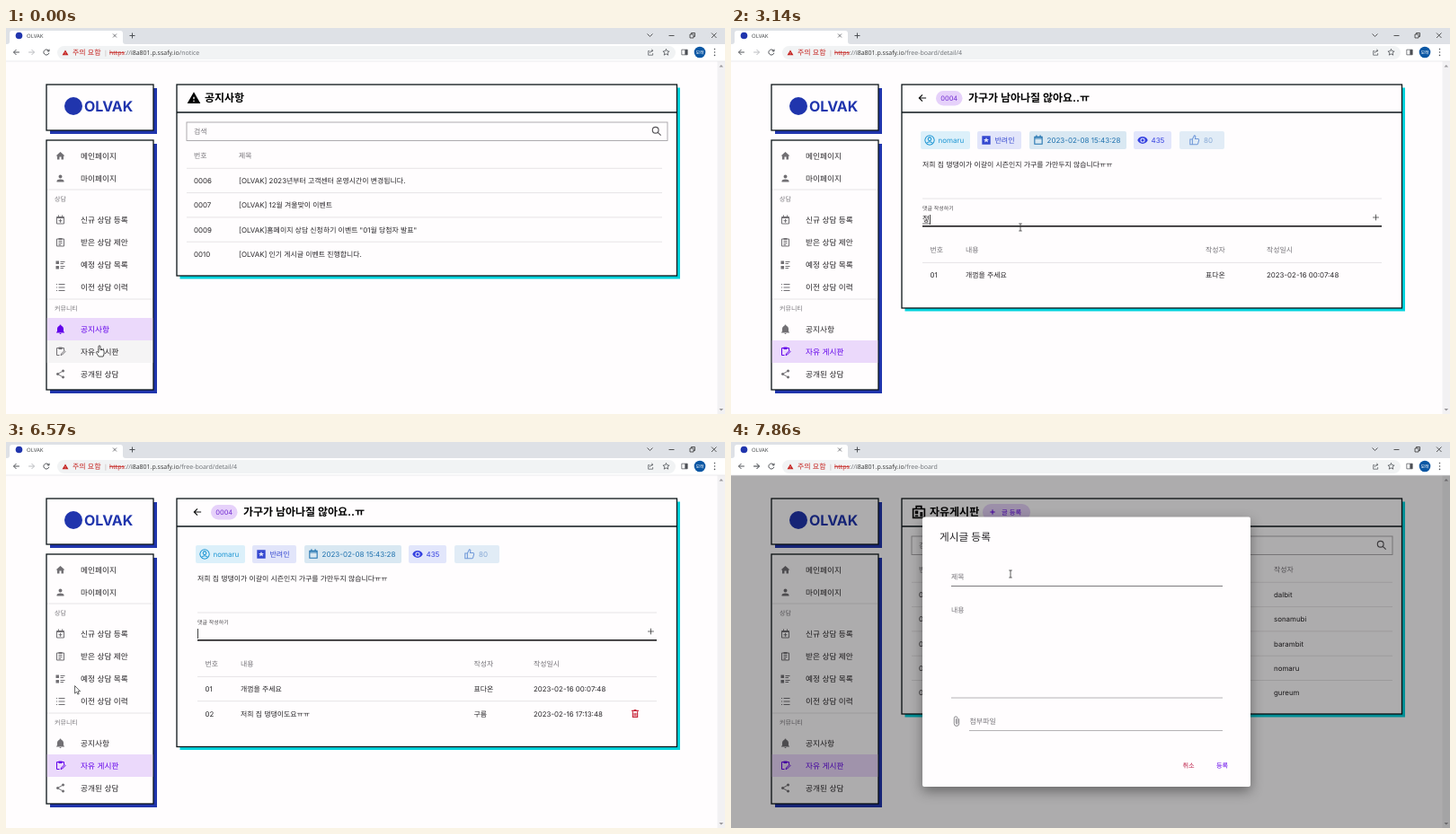
An HTML page for the animation above (8000 ms loop, 800 by 430 pixels).

```html
<!DOCTYPE html>
<html lang="ko">
<head>
<meta charset="utf-8">
<title>OLVAK</title>
<style>
html, body { margin: 0; width: 100%; height: 100%; overflow: hidden; background: #fffdfe; }
svg { display: block; width: 800px; height: 430px; }
text { font-family: Inter, 'Noto Sans CJK KR', 'Noto Sans CJK', sans-serif; white-space: pre; text-rendering: geometricPrecision; }
.ui text { font-family: 'Open Sans', 'Noto Sans CJK KR', 'Noto Sans CJK', sans-serif; }
#dialog { transform-origin: 293px 67px; }
#dialog > rect { filter: drop-shadow(0 5px 7px rgba(0,0,0,.4)); }
</style>
</head>
<body>
<svg id="stage" viewBox="0 0 800 430"></svg>
<script>
const LOOP = 8000, FRAMES = 56;
const INK = '#262427', GREY = '#77757a', PURPLE = '#6200ea', NAVY = '#2035ad', CYAN = '#00d3dd', RULE = '#e6e4e6';

// 24-unit icons: f = filled path, s = stroked path
const ICONS = {
  home: { f: 'M10 20v-6h4v6h5v-8h3L12 3 2 12h3v8z' },
  user: { f: 'M12 4a4 4 0 1 1 0 8 4 4 0 0 1 0-8m0 10c4.4 0 8 1.8 8 4v2H4v-2c0-2.2 3.6-4 8-4' },
  calAdd: { s: 'M4 5h16v15H4zM4 7h16M8 1v4M16 1v4M12 9.500v8M8 13.500h8' },
  clip: { s: 'M4 4h16v16H4zM8 9h8M8 13h8M8 17h5', f: 'M8 2h8v4H8z' },
  details: { s: 'M12 5h10M12 9h7M12 15h10M12 19h7', f: 'M2 3h7v7H2zM2 14h7v7H2z' },
  list: { s: 'M8 5h14M8 12h14M8 19h14M3 5h2M3 12h2M3 19h2' },
  bell: { f: 'M21 19v1H3v-1l2-2v-6c0-3.100 2-5.800 5-6.700V4a2 2 0 0 1 4 0v.3c3 .9 5 3.600 5 6.700v6l2 2M14 21a2 2 0 0 1-4 0' },
  edit: { s: 'M10 20H4V4h16v6M13 20l1-3 7-7 2 2-7 7z', f: 'M8 2h8v5H8z' },
  share: { s: 'M18 5 6 12l12 7', f: 'M18 2a3 3 0 1 0 .1 0zM6 9a3 3 0 1 0 .1 0zM18 16a3 3 0 1 0 .1 0z' },
  warn: { f: 'M1 21h22L12 2zm12-3h-2v-2h2zm0-4h-2v-4h2z' },
  board: { s: 'M3 7h18v14H3zM8 7V3h8v4', f: 'M6 10h5v5H6zM6 17h5v2H6zM14 12h4v7h-4z' },
  search: { s: 'M16 9.500a6.500 6.500 0 1 0-13 0 6.500 6.500 0 1 0 13 0M14.500 14.500 21 21' },
  back: { s: 'M21 12H4M12 4l-8 8 8 8' },
  next: { s: 'M3 12h17M12 4l8 8-8 8' },
  reload: { s: 'M19.500 14a8 8 0 1 1-2-7.500L20 9M20 3v6h-6' },
  plus: { s: 'M12 4v16M4 12h16' },
  close: { s: 'M4 4l16 16M20 4 4 20' },
  face: { s: 'M12 2a10 10 0 1 0 .1 0zM12 6a3.500 3.500 0 1 0 .1 0zM5 19q7-7 14 0' },
  starBox: { f: 'M3 3h18v18H3zM12 6l-1.700 4H6l3.500 2.700L8 17l4-2.600L16 17l-1.500-4.300L18 10h-4.300z' },
  cal: { s: 'M4 5h16v15H4zM4 8h16M8 1v4M16 1v4' },
  eye: { f: 'M12 4.500C7 4.500 2.700 7.600 1 12c1.700 4.400 6 7.500 11 7.500s9.300-3.100 11-7.500c-1.700-4.400-6-7.500-11-7.500M12 17a5 5 0 1 1 0-10 5 5 0 0 1 0 10m0-8a3 3 0 1 0 0 6 3 3 0 0 0 0-6' },
  thumb: { s: 'M7 10l4-8q3 0 2.500 3L13 9h6q2.500.5 2 3l-2 7q-.5 2-2 2H7zM2 10h5v11H2z' },
  trash: { s: 'M6 7v14h12V7M3 5h18M9 3h6M10 10v8M14 10v8' },
  attach: { s: 'M17 7v10a5 5 0 0 1-10 0V6a3.300 3.300 0 0 1 7 0v10a1.500 1.500 0 0 1-3 0V7' },
  star: { s: 'M12 3l2.700 6 6.300.6-4.800 4.200 1.500 6.200L12 16.700 6.300 20l1.500-6.200L3 9.600 9.300 9z' },
  out: { s: 'M8 8H4v13h14v-6M8 15q1-8 10-8M14 3l5 4-5 4' },
  panel: { s: 'M3 4h18v16H3z', f: 'M13 4h8v16h-8z' }
};

const text = (x, y, str, size = 7.9, fill = INK, attrs = '') =>
  `<text x="${x}" y="${y + size * .37}" font-size="${size}" fill="${fill}" ${attrs}>${str}</text>`;
const rect = (x, y, w, h, fill, attrs = '') =>
  `<rect x="${x}" y="${y}" width="${w}" height="${h}" fill="${fill}" ${attrs}/>`;
const line = (x1, x2, y, color = RULE, w = 1) =>
  `<path d="M${x1} ${y}H${x2}" stroke="${color}" stroke-width="${w}"/>`;
const stroke = (d, color, w = 1) => `<path d="${d}" fill="none" stroke="${color}" stroke-width="${w}"/>`;
const group = (id, body, attrs = '') => `<g id="${id}" ${attrs}>${body}</g>`;
const bold = 'font-weight="700"';

function icon(name, x, y, size, color, w = 2) {
  const { f, s } = ICONS[name], k = size / 24;
  return `<g transform="translate(${x - size / 2} ${y - size / 2}) scale(${k})">` +
    (f ? `<path d="${f}" fill="${color}" fill-rule="evenodd"/>` : '') +
    (s ? stroke(s, color, w) : '') + '</g>';
}

const card = (x, y, w, h, shade, d = 4) =>
  rect(x + d, y + d, w, h, shade) + rect(x, y, w, h, '#fffdfe', 'stroke="#0b1418" stroke-width="1.3"');
const panel = bottom => card(190, 63, 556.5, bottom - 63, CYAN, 3.5) + line(190, 746.5, 94, '#0b1418', 1.3);

function browser() {
  const dark = '#4c4f54';
  return rect(0, 0, 800, 18, '#dee1e6') + rect(0, 18, 800, 19, '#fff') +
    '<path d="M1 18q3 0 3-3V6q0-3 3-3H127q3 0 3 3v9q0 3 3 3z" fill="#fff"/>' +
    `<circle cx="14.500" cy="8.500" r="3.800" fill="${NAVY}"/>` + text(23, 8.5, 'OLVAK', 6, '#3c4043') +
    icon('close', 121, 8.5, 6, dark, 3) + icon('plus', 140.5, 8.5, 9, dark, 2.6) +
    stroke('M713.500 6.500l3 3 3-3M737.500 8.500h6M761 7h4v4h-4zM762.500 7V5.500h4v4H765M785 5.500l5.500 5.500M790.500 5.500l-5.500 5.500', '#333', .8) +
    icon('back', 11.5, 27, 9, dark, 2.6) + icon('next', 28.5, 27, 9, '#b9bbbe', 2.6) +
    group('forward', icon('next', 28.5, 27, 9, dark, 2.6)) + icon('reload', 45, 27, 9, dark, 2.6) +
    rect(57, 20, 688, 15, '#f1f3f4', 'rx="7.5"') +
    icon('warn', 66, 27.5, 7.5, '#c5221f') + text(74, 27, '주의 요함', 8, '#c5221f') +
    text(109, 27, '|', 7, '#b9a9a9') + line(115, 132, 27.5, '#c5221f', .7) +
    `<text x="115" y="29.600" font-size="7" fill="#6b6e73"><tspan fill="#c5221f">https</tspan>://<tspan fill="#333">i8a801.p.ssafy.io</tspan><tspan id="path"></tspan></text>` +
    icon('out', 717.5, 27, 8.5, dark) + icon('star', 734.5, 27, 9.5, dark) + icon('panel', 755, 27, 8.5, dark) +
    '<circle cx="772" cy="27" r="6.300" fill="#0b57a4"/>' + text(772, 27, '모래', 5, '#fff', 'text-anchor="middle"') +
    `<path d="M788.500 23.500v.1m0 3.300v.1m0 3.300v.1" stroke="${dark}" stroke-width="1.500" stroke-linecap="round"/>` +
    line(0, 800, 37, '#e3e3e6', .7);
}

const MENU = [
  ['home', '메인페이지', 142.5], ['user', '마이페이지', 167.5],
  ['calAdd', '신규 상담 등록', 214], ['clip', '받은 상담 제안', 239],
  ['details', '예정 상담 목록', 264], ['list', '이전 상담 이력', 289],
  ['bell', '공지사항', 335.5], ['edit', '자유 게시판', 360.5], ['share', '공개된 상담', 385.5]
];

function menu(selected, hovered) {
  return MENU.map(([name, label, y], i) => {
    const on = i === selected;
    const back = on ? '#ebd9fb' : i === hovered ? '#f5f4f5' : '';
    return (back ? rect(45.8, y - 12.5, 117.4, 25, back) : '') +
      icon(name, 60.5, y, 12, on ? PURPLE : '#727074') + text(83, y, label, 8.7, on ? PURPLE : INK);
  }).join('');
}

const sidebar = () =>
  card(45, 63, 119, 51, NAVY) + `<circle cx="75" cy="87" r="10" fill="${NAVY}"/>` +
  text(87, 87, 'OLVAK', 16, NAVY, bold) + card(45, 125, 119, 278, NAVY) +
  line(46, 163, 180) + line(46, 163, 302) +
  text(54, 190.5, '상담', 7, GREY) + text(54, 312.5, '커뮤니티', 7, GREY) +
  group('menuNotice', menu(6, 7)) + group('menuFree', menu(7, -1));

function table(rows, right) {
  let out = rect(201, 105, 535, 20.5, 'none', 'stroke="#a5a3a6" stroke-width=".9"') +
    text(209, 115, '검색', 7.9, GREY) + icon('search', 724, 115, 12.5, '#565458', 2.2) +
    text(209, 142.5, '번호', 7.9, GREY) + text(259, 142.5, '제목', 7.9, GREY) +
    (rows[0][2] ? text(604, 142.5, '작성자', 7.9, GREY) : '');
  rows.forEach(([no, title, by], i) => {
    const y = 170 + i * 27.3;
    out += line(201, right, y - 13.7) + text(209, y, no) + text(259, y, title) + (by ? text(604, y, by) : '');
  });
  return out;
}

const notice = () => panel(276) + icon('warn', 209, 78, 16, '#000') + text(221, 78, '공지사항', 12, '#000', bold) +
  table([
    ['0006', '[OLVAK] 2023년부터 고객센터 운영시간이 변경됩니다.'],
    ['0007', '[OLVAK] 12월 겨울맞이 이벤트'],
    ['0009', '[OLVAK]홈페이지 상담 신청하기 이벤트 "01월 당첨자 발표"'],
    ['0010', '[OLVAK] 인기 게시글 이벤트 진행합니다.']
  ], 730);

const free = () => panel(303) + icon('board', 209, 78, 17, '#000', 2.3) + text(221, 78, '자유게시판', 12, '#000', bold) +
  rect(280, 69, 53, 18.5, '#e6d2f9', 'rx="9.2"') + icon('plus', 291, 78, 8, PURPLE, 3) +
  text(301, 78.5, '글 등록', 7.3, PURPLE) +
  table([
    ['0001', '토끼가 강한 이유를 아십니까?', 'dalbit'],
    ['0002', 'How to 고양이 인테리어!', 'sonamubi'],
    ['0003', '강아지 양치하는 방법', 'barambit'],
    ['0004', '가구가 남아나질 않아요..ㅠ', 'nomaru'],
    ['0005', '이럴거면 일본을 갔습니다', 'gureum']
  ], 736);

const chip = (x, w, name, label, back, color) =>
  rect(x, 115, w, 20, back, 'rx="2"') + icon(name, x + 10, 125, 12.5, color) + text(x + 19.5, 125.3, label, 8, color);

const comments = (byX, atX, rows) =>
  [['번호', '내용', '작성자', '작성일시'], ...rows].map((row, i) => {
    const y = i ? 248 + i * 27.3 : 247;
    return [221.5, 261, byX, atX].map((x, j) => text(x, y, row[j], 7.9, i ? INK : GREY)).join('') +
      (i ? line(213, 724, y - 13.9) : '');
  }).join('');

function detail() {
  const first = ['01', '개껌을 주세요', '표다온', '2023-02-16 00:07:48'];
  const second = ['02', '저희 집 댕댕이도요ㅠㅠ', '구름', '2023-02-16 17:13:48'];
  return group('before', panel(312) + comments(528, 596, [first])) +
    group('after', panel(339.5) + comments(520.5, 587, [first, second]) + icon('trash', 700, 302.5, 10.5, '#c8283c', 2.6)) +
    icon('back', 213, 78, 11, '#111', 2.6) + rect(228, 70, 29.5, 16.5, '#e6d1fa', 'rx="8.2"') +
    text(242.7, 78.3, '0004', 7.5, '#7430d2', 'text-anchor="middle"') +
    text(264, 78, '가구가 남아나질 않아요..ㅠ', 12, '#000', bold) +
    chip(211, 55, 'face', 'nomaru', '#dcf0fa', '#1f97d4') +
    chip(274, 49, 'starBox', '반려인', '#e2e5fa', '#3447d0') +
    chip(332, 108, 'cal', '2023-02-08 15:43:28', '#d9e8f2', '#1c70ae') +
    chip(448, 42, 'eye', '435', '#e2e6fb', '#3440e0') +
    rect(499, 115, 50, 20, '#e1ecf6', 'rx="2"') + icon('thumb', 516, 125, 12.5, '#6f98d8') + text(526, 125.3, '80', 8, '#86a9d6') +
    text(213, 152, '저희 집 댕댕이가 이갈이 시즌인지 가구를 가만두지 않습니다ㅠㅠ') +
    line(213, 724, 190) + line(213, 724, 221, '#a8a6a9') + icon('plus', 717.5, 211, 10, '#444') +
    '<path id="focusLine" stroke="#1c1b1d" stroke-width="1.400"/>' +
    '<text id="label" x="213">댓글 작성하기</text>' +
    `<text id="typed" x="213" y="216.300" font-size="8.700" fill="${INK}"></text>` +
    '<path id="compose" stroke="#333" stroke-width=".7"/><path id="caret" stroke="#111" stroke-width=".8"/>';
}

const dialog = () => rect(213, 83.5, 365, 300.5, '#fffdfe', 'rx="2"') + group('form',
  text(232, 106, '게시글 등록', 11.7, INK, 'font-weight="500"') +
  text(245, 150, '제목', 7.9, GREY) + line(245, 547, 160.5, '#7c7a7d') +
  text(245, 187, '내용', 7.9, GREY) + line(245, 547, 285, '#b4b2b5') +
  icon('attach', 251, 311, 13, '#77757a', 1.6) + text(265.5, 311, '첨부파일', 8, GREY) + line(265, 547, 321.5, '#b4b2b5') +
  text(502.5, 360, '취소', 7.2, '#b8103c') + text(540, 360, '등록', 7.2, PURPLE));

const cursors = () =>
  group('hand', '<path d="M-1 .8a1 1 0 0 1 2 0V4.500h2.500q1.600.3 1.600 2V8q0 2-1 4H-.8L-3.600 7.600q0-1.400 1.400-1L-1 7.600z" fill="#fff" stroke="#222" stroke-width=".8"/>') +
  group('arrow', '<path d="M0 0V8.500L2 6.700 3.300 9.500 4.600 9 3.400 6.200H6z" fill="#fff" stroke="#222" stroke-width=".7"/>') +
  group('beam', stroke('M-1.700-4H1.700M0-4V4M-1.700 4H1.700', '#333', .8));

document.getElementById('stage').innerHTML =
  rect(0, 0, 800, 430, '#fffdfe') + rect(791.5, 37, 8.5, 393, '#f2f1f3') +
  '<path d="M793.500 43.500l2.300-2.500 2.300 2.500zM793.500 424l2.300 2.500 2.300-2.500z" fill="#9a989c"/>' +
  sidebar() + group('notice', notice()) + group('free', free()) + group('detail', detail()) +
  group('scrim', rect(0, 37, 800, 393, '#000')) + group('dialog', dialog()) +
  group('browser', browser(), 'class="ui"') + group('cursor', cursors());

// Tables of [time, value...]
const PAGES = [[0, 'notice', '/notice'], [290, 'free', '/free-board'], [1140, 'detail', '/free-board/detail/4'], [7000, 'free', '/free-board']];
const TYPING = [[0, ''], [2710, 'ㅈ'], [2860, '저'], [3140, '젛'], [3290, '저희'], [3430, '저희 '], [3570, '저희 집'],
  [3710, '저희 집 대'], [3860, '저희 집 댕'], [4000, '저희 집 댕댕'], [4140, '저희 집 댕댕이'], [4290, '저희 집 댕댕이도'],
  [4430, '저희 집 댕댕이도요'], [4570, '저희 집 댕댕이도요ㅠㅠ'], [4710, '']];
const SHAPES = [[0, 'hand'], [430, 'arrow'], [860, 'hand'], [1140, 'arrow'], [1430, 'beam'], [5430, 'arrow'], [5860, 'hand'],
  [6430, 'arrow'], [7290, 'hand'], [7570, 'arrow'], [7860, 'beam']];
const MOVES = [[0, 104, 354], [430, 104, 354], [1000, 290, 249], [1290, 290, 249], [1570, 322, 225], [1710, 322, 222], [5290, 322, 222],
  [6000, 96, 354], [6430, 96, 354], [6860, 18, 23], [7000, 18, 23], [7430, 306, 82], [7570, 304, 83], [7860, 311, 147]];
const CARET = [[0, 0], [2000, 1], [2430, 0], [2710, 1], [5000, 0], [5290, 1], [5710, 0], [6290, 1]];

const $ = Object.fromEntries([...document.querySelectorAll('[id]')].map(e => [e.id, e]));
const clamp = v => Math.min(1, Math.max(0, v));
const at = (steps, t) => steps.findLast(s => s[0] <= t);
const show = (id, on) => { $[id].style.display = on ? '' : 'none'; };

function place(t) {
  const i = MOVES.findLastIndex(m => m[0] <= t), a = MOVES[i], b = MOVES[i + 1] || a;
  const p = clamp((t - a[0]) / (b[0] - a[0] || 1)), e = p * p * (3 - 2 * p);
  return [a[1] + (b[1] - a[1]) * e, a[2] + (b[2] - a[2]) * e];
}

function drawField(t) {
  const p = clamp((t - 1930) / 300), e = p * (2 - p);
  const size = 7.9 - 1.9 * e, half = 255.5 * e;
  $.label.setAttribute('font-size', size);
  $.label.setAttribute('y', 211 - 10 * e + size * .37);
  $.label.setAttribute('fill', p ? '#4a484c' : GREY);
  $.focusLine.setAttribute('d', p ? `M${468.5 - half} 220.700H${468.5 + half}` : '');
  const str = at(TYPING, t)[1];
  if ($.typed.textContent !== str) $.typed.textContent = str;
  const width = str ? $.typed.getComputedTextLength() : 0;
  const x = 213.5 + width;
  $.compose.setAttribute('d', str && !str.endsWith(' ') ? `M${x - 8.5} 218H${x - .5}` : '');
  $.caret.setAttribute('d', at(CARET, t)[1] ? `M${x} 208V219` : '');
}

function render(t) {
  const [, page, path] = at(PAGES, t), shape = at(SHAPES, t)[1];
  for (const id of ['notice', 'free', 'detail']) show(id, id === page);
  show('menuNotice', page === 'notice');
  show('menuFree', page !== 'notice');
  show('before', t < 4710);
  show('after', t >= 4710);
  show('forward', t >= 7000);
  $.path.textContent = path;
  if (page === 'detail') drawField(t);

  const p = clamp((t - 7430) / 210);
  show('scrim', p);
  show('dialog', p);
  show('form', p === 1);
  $.scrim.style.opacity = .32 * p ** .6;
  $.dialog.style.opacity = 1 - (1 - p) ** 2;
  $.dialog.style.transform = `scale(${.46 + .54 * p})`;

  for (const id of ['hand', 'arrow', 'beam']) show(id, id === shape);
  $.cursor.setAttribute('transform', `translate(${place(t)})`);
}

const start = performance.now();
let last = -1;
function tick() {
  const t = (performance.now() - start) % LOOP;
  const step = Math.floor((t + 5) * FRAMES / LOOP) % FRAMES;
  if (step !== last) render(Math.round(step * LOOP / FRAMES / 10) * 10);
  last = step;
  requestAnimationFrame(tick);
}
tick();
</script>
</body>
</html>
```
